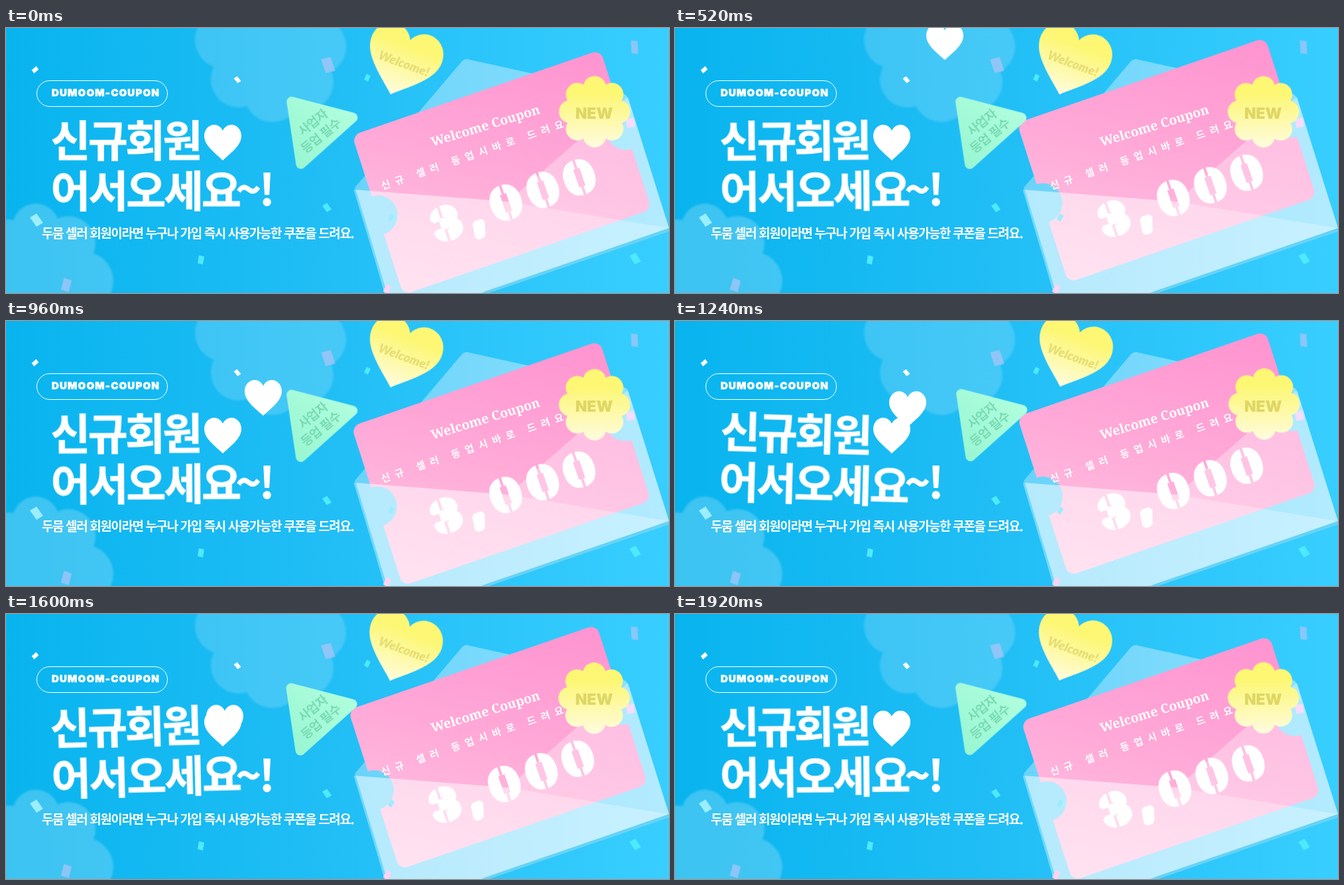
These frames come from a looping animation (1000x400 px, 1960 ms). An HTML page without scripts:

```html
<!DOCTYPE html>
<html lang="ko">
<head>
<meta charset="utf-8">
<title>Welcome coupon banner</title>
<style>
  html, body { margin: 0; width: 100%; height: 100%; overflow: hidden; background: #1fbcf4; }
  svg { display: block; width: 100vw; height: 100vh; }
  text { font-family: "Noto Sans CJK KR", "Noto Sans CJK", "Noto Sans", sans-serif; font-weight: 700; }
  .mid { text-anchor: middle; }
  .title { font-size: 65px; letter-spacing: -3.4px; stroke: #fff; stroke-width: .8; }
  .wide { letter-spacing: -2.9px; }
  .brand { font: 900 15px Inter, sans-serif; letter-spacing: 1.2px; stroke: #fff; stroke-width: .6; }
  .sub { font-size: 19px; letter-spacing: -1.4px; }
  .serif { font: 900 19.5px "Noto Serif", serif; }
  .note { font-size: 15px; letter-spacing: 8px; }
  .price { font: 900 62px Inter, sans-serif; stroke: #fff; stroke-width: 8; stroke-linejoin: bevel; }
  .script { font: italic 900 19px Lato, sans-serif; }
  .need { font-size: 19px; letter-spacing: -1px; }
  .new { font: 900 23px Inter, sans-serif; }

  .card, .price-move, .drop { animation: 1960ms linear infinite; }
  .card { animation-name: lift; }
  .price-move { animation-name: nudge; }
  .drop { animation-name: drop; }
  .rock, .bob { animation: 490ms cubic-bezier(.37, 0, .63, 1) -245ms infinite alternate; }
  .rock { animation-name: rock; transform-origin: 195px 208px; }
  .bob { animation-name: bob; }

  @keyframes rock { from { transform: rotate(-1.8deg); } to { transform: rotate(1.6deg); } }
  @keyframes bob { from { transform: translate(-1.2px, 1.2px); } to { transform: translate(.7px, -.8px); } }
  @keyframes lift {
    0%, 51%, 98%, 100% { transform: none; }
    7%, 57% { transform: translate(-3.6px, -11px); }
    14.3%, 64% { transform: translate(-6.2px, -18.6px); }
    22%, 72% { transform: translate(-6.7px, -20px); }
    31%, 81.6% { transform: translate(-5.8px, -17px); }
    38.8%, 89% { transform: translate(-3.2px, -9.5px); }
    49% { transform: translate(-1px, -3px); }
  }
  @keyframes nudge {
    0%, 51%, 98%, 100% { transform: none; }
    12%, 39%, 62%, 88% { transform: translate(-2.4px, -7px); }
    49% { transform: translate(-.4px, -1px); }
  }
  @keyframes drop {
    0%, 15% { transform: translate(398px, -32px); }
    28% { transform: translate(408px, 28px); }
    38.8% { transform: translate(405px, 75px); }
    44% { transform: translate(399px, 98px); }
    49% { transform: translate(388px, 116px); }
    56% { transform: translate(369px, 125px); }
    63.3% { transform: translate(351px, 133px); }
    72% { transform: translate(338px, 147px); }
    81.6% { transform: translate(330px, 164px); }
    87%, 100% { transform: translate(327px, 173px); }
  }
</style>
</head>
<body>
<svg viewBox="0 0 1000 400" preserveAspectRatio="none">
  <defs>
    <linearGradient id="sky">
      <stop offset="0" stop-color="#08b4ee"/>
      <stop offset=".45" stop-color="#1fbdf5"/>
      <stop offset="1" stop-color="#38ceff"/>
    </linearGradient>
    <linearGradient id="pink" x1="1" y1="0" x2="0" y2="1">
      <stop offset="0" stop-color="#ff93d0"/>
      <stop offset=".5" stop-color="#ffaad8"/>
      <stop offset="1" stop-color="#ffc6e2"/>
    </linearGradient>
    <linearGradient id="yellow" x1="0" y1="0" x2="0" y2="1">
      <stop offset=".25" stop-color="#fdf774"/>
      <stop offset="1" stop-color="#fffce0"/>
    </linearGradient>
    <linearGradient id="green" x1="0" y1="1" x2="1" y2="0">
      <stop offset="0" stop-color="#98f6d2"/>
      <stop offset="1" stop-color="#b2ffdf"/>
    </linearGradient>
    <linearGradient id="back">
      <stop offset="0" stop-color="#6ad3fa"/>
      <stop offset="1" stop-color="#90e2ff"/>
    </linearGradient>
    <filter id="soft"><feGaussianBlur stdDeviation="1.5"/></filter>
    <path id="heart" d="M0 27C-10 17-28 5-28-10C-28-21-20-27-13-27C-7-27-2-23 0-18C2-23 7-27 13-27C20-27 28-21 28-10C28 5 10 17 0 27Z"/>
    <path id="bit" d="M-3-7L5-5L3 7L-5 5Z"/>
    <mask id="stencil" maskUnits="userSpaceOnUse" x="-50" y="-50" width="320" height="110">
      <path fill="#fff" d="M-50-50H270V60H-50Z"/>
      <path stroke="#000" stroke-width="4" d="M-4-30V-9M-4 9V30M95-30V30M154-30V30M212-30V30"/>
      <path stroke="#000" stroke-width="10" d="M95-13V15M154-13V15M212-13V15"/>
    </mask>
  </defs>

  <path fill="url(#sky)" d="M0 0H1000V400H0Z"/>

  <!-- clouds -->
  <g fill="#fff" filter="url(#soft)">
    <g opacity=".17">
      <circle cx="328" cy="18" r="43"/><circle cx="400" cy="0" r="50"/>
      <circle cx="470" cy="28" r="43"/><circle cx="351" cy="78" r="42"/>
      <circle cx="402" cy="99" r="43"/><circle cx="452" cy="82" r="42"/>
      <circle cx="400" cy="50" r="55"/>
    </g>
    <g opacity=".21">
      <circle cx="45" cy="300" r="35"/><circle cx="94" cy="325" r="41"/>
      <circle cx="4" cy="330" r="41"/><circle cx="118" cy="382" r="44"/>
      <circle cx="40" cy="375" r="60"/>
    </g>
  </g>

  <!-- confetti -->
  <g fill="#4deaff">
    <use href="#bit" transform="translate(545 75) rotate(15) scale(.8)"/>
    <use href="#bit" transform="translate(484 271) rotate(-45)"/>
    <use href="#bit" transform="translate(294 350)"/>
    <use href="#bit" transform="translate(949 348) rotate(-42) scale(1.25)"/>
    <use href="#bit" transform="translate(46 290) rotate(-45) scale(1.4)" fill="#9beeff"/>
  </g>
  <g fill="#fff">
    <use href="#bit" transform="translate(44 63) rotate(40) scale(.75)"/>
    <use href="#bit" transform="translate(349 78) rotate(-50) scale(.75)"/>
  </g>
  <g fill="#b9c4f8" opacity=".65">
    <use href="#bit" transform="translate(486 56) rotate(-28) scale(1.8)"/>
    <use href="#bit" transform="translate(948 29) rotate(-10) scale(1.2 1.6)"/>
    <use href="#bit" transform="translate(91 388) rotate(5) scale(1.5)"/>
  </g>

  <!-- headline -->
  <g fill="#fff">
    <rect x="46.5" y="79.5" width="197" height="39" rx="19.5" fill="none" stroke="#fff"/>
    <text class="brand" x="69" y="103">DUMOOM-COUPON</text>
    <g class="rock title">
      <text x="67.5" y="194">신규회원</text>
      <text class="wide" x="67.5" y="269.5">어서오세요</text>
    </g>
    <text class="title" x="346.5" y="268">~!</text>
    <use href="#heart" x="327" y="173"/>
    <text class="sub" x="54" y="316.5">두뭄 셀러 회원이라면 누구나 가입 즉시 사용가능한 쿠폰을 드려요.</text>
  </g>

  <!-- envelope and coupon -->
  <path fill="url(#back)" d="M526 241L687 51Q692 45 700 48L928 98Q936 100 939 108L1000 302L720 400H571Z"/>
  <g class="card">
    <path fill="url(#pink)" transform="translate(522 162) rotate(-19) skewX(-1.2)"
      d="M13 0H383a13 13 0 0 1 13 13V97a30 30 0 0 0 0 60V240a13 13 0 0 1-13 13H13a13 13 0 0 1-13-13V157a30 30 0 0 0 0-60V13A13 13 0 0 1 13 0Z"/>
  </g>
  <g fill="#fff">
    <path opacity=".5" d="M526 244L757 262L690 318L640 400H571Z"/>
    <path opacity=".32" d="M757 262L938 104L1000 302Z"/>
    <path opacity=".5" d="M640 400L690 318L757 262L1000 302L716 400Z"/>
  </g>
  <path d="M1000 305L722 400" stroke="#68d3f5" stroke-width="4"/>
  <path d="M526 244L573 400" stroke="#70d9fa" stroke-width="3"/>

  <g fill="#fff">
    <text class="serif mid" transform="translate(725 154) rotate(-17)">Welcome Coupon</text>
    <text class="note" transform="translate(568 244) rotate(-19)">신규 셀러 등업시바로 드려요</text>
    <g class="price-move">
      <g transform="translate(664 294) rotate(-19)">
        <text class="price mid" mask="url(#stencil)" x="0 46 95 154 212" y="23">3,000</text>
      </g>
    </g>
  </g>
  <use href="#bit" transform="translate(942 143) rotate(-20) scale(1.5 1.1)" fill="#f6dcff"/>
  <use href="#bit" transform="translate(575 394) rotate(15)" fill="#ffd3f1"/>
  <use href="#bit" transform="translate(581 286) rotate(20) scale(.8)" fill="#9cecff"/>

  <!-- badges -->
  <g class="bob">
    <use href="#heart" fill="url(#yellow)" transform="translate(598 51) rotate(20) scale(2.02 1.93)"/>
    <path fill="url(#green)" stroke="url(#green)" stroke-width="15" stroke-linejoin="round" d="M431 111L523 135L445 205Z"/>
    <path fill="url(#yellow)" transform="translate(888 126)"
      d="M-16.8-40.7A17.3 17.3 0 0 1 16.8-40.7A17.3 17.3 0 0 1 40.7-16.8A17.3 17.3 0 0 1 40.7 16.8A17.3 17.3 0 0 1 16.8 40.7A17.3 17.3 0 0 1-16.8 40.7A17.3 17.3 0 0 1-40.7 16.8A17.3 17.3 0 0 1-40.7-16.8A17.3 17.3 0 0 1-16.8-40.7Z"/>
  </g>
  <text class="script mid" fill="#e6dd72" transform="translate(598 60) rotate(20)">Welcome!</text>
  <g class="need mid" fill="#7adbb3">
    <text transform="translate(467 148) rotate(-39)">사업자</text>
    <text transform="translate(479 168) rotate(-39)">등업 필수</text>
  </g>
  <text class="new mid" fill="#dfd665" x="887" y="137">NEW</text>

  <use class="drop" href="#heart" fill="#fff"/>
</svg>
</body>
</html>
```
